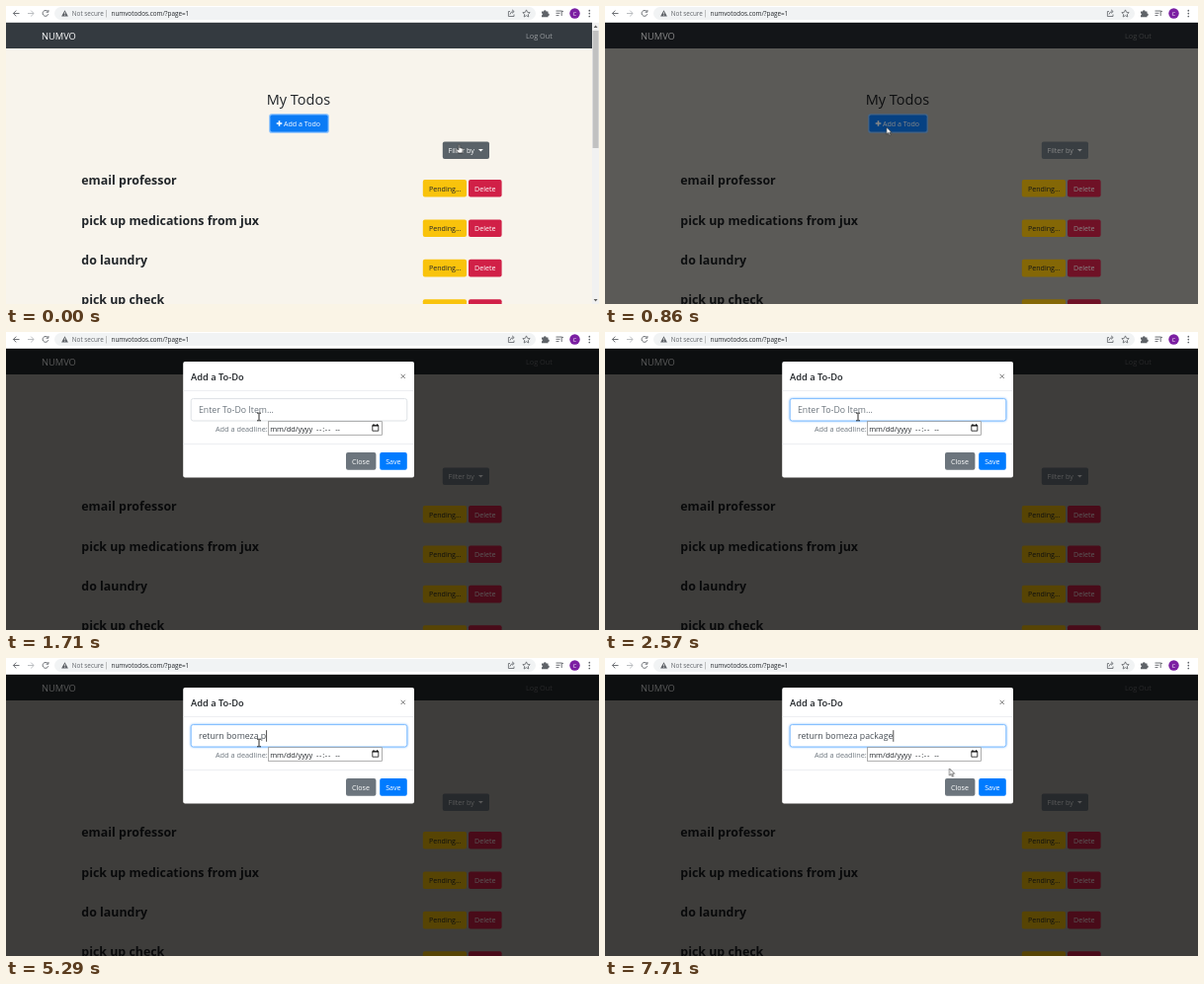
An HTML page for the animation above (8 s loop, 600 px wide and 302 px high).

```html
<!DOCTYPE html>
<html lang="en">
<head>
<meta charset="utf-8">
<title>My Todos</title>
<style>
html, body { margin: 0; width: 100%; height: 100%; overflow: hidden; background: #f8f4ec; }
svg { display: block; width: 100vw; height: 100vh; font-family: "Open Sans", "Noto Sans", sans-serif; }
text { white-space: pre; fill: #212529; }
.ui { font-size: 7.1px; }
.url { font-size: 6.35px; }
.todo { font-size: 12.4px; font-weight: 700; }
.light { fill: #fff; }
.grey { fill: #6c757d; }
.icon { fill: none; stroke: #5f6368; stroke-width: .9; }

/* One loop is 56 ticks of 1/7 s; a tick is 1.7857% */
.anim { animation: 8s step-end -10ms infinite; }
#dim { animation-name: dim; }
#lit { animation-name: lit; }
#bar { animation-name: bar; }
#filter { animation-name: hover; }
#modal { animation-name: drop; }
#field { animation-name: focus; }
#pointer { animation-name: move; }
#hand { animation-name: hand; }
#arrow { animation-name: arrow; }
#beam { animation-name: beam; }

@keyframes dim {
  0% { opacity: 0; }
  10.714% { opacity: .63; }
  12.5%, 100% { opacity: .75; }
}
@keyframes lit {
  0% { filter: brightness(1); }
  10.714% { filter: brightness(.53); }
  12.5%, 100% { filter: brightness(.35); }
}
@keyframes bar {
  0% { opacity: 1; }
  10.714%, 100% { opacity: 0; }
}
@keyframes hover {
  0% { fill: #5a6268; }
  1.786%, 100% { fill: #6c757d; }
}
@keyframes drop {
  0% { opacity: 0; transform: translateY(-9px); }
  12.5% { opacity: .89; transform: translateY(-9px); }
  14.286%, 100% { opacity: 1; transform: none; }
}
@keyframes focus {
  0% { stroke: #dde1e5; filter: none; }
  26.786%, 100% { stroke: #80bdff; filter: drop-shadow(0 0 1.2px #80bdff); }
}
@keyframes move {
  0% { transform: translate(458.5px, 140px); }
  1.786% { transform: translate(458.5px, 140px); animation-timing-function: steps(4, start); }
  8.929% { transform: translate(284.8px, 122.8px); }
  16.071% { transform: translate(284.8px, 122.8px); animation-timing-function: steps(4, start); }
  23.214% { transform: translate(256px, 86px); }
  89.286% { transform: translate(256px, 86px); animation-timing-function: steps(5, start); }
  98.214%, 100% { transform: translate(348.5px, 112px); }
}
@keyframes hand {
  0% { opacity: 1; }
  1.786% { opacity: 0; }
  7.143% { opacity: 1; }
  10.714%, 100% { opacity: 0; }
}
@keyframes arrow {
  0% { opacity: 0; }
  1.786% { opacity: 1; }
  7.143% { opacity: 0; }
  10.714% { opacity: 1; }
  21.429% { opacity: 0; }
  89.286%, 100% { opacity: 1; }
}
@keyframes beam {
  0% { opacity: 0; }
  21.429% { opacity: 1; }
  89.286%, 100% { opacity: 0; }
}
</style>
</head>
<body>
<svg viewBox="0 0 600 302" preserveAspectRatio="none">
  <defs>
    <g id="actions">
      <rect x="421.8" y="176" width="44.2" height="17.6" rx="2" fill="#f9c30c"/>
      <text class="ui" x="428" y="187.6">Pending...</text>
      <rect x="468" y="176" width="33.6" height="17.6" rx="2" fill="#d12047"/>
      <text class="ui light" x="474" y="187.6">Delete</text>
    </g>
  </defs>

  <!-- page -->
  <rect width="600" height="302" fill="#f8f4ec"/>
  <rect y="16" width="600" height="27" fill="#343a40"/>
  <text x="526" y="33.4" font-size="7.3" style="fill:#9a9da0">Log Out</text>
  <text x="263.7" y="99.5" font-size="14.5" font-weight="500">My Todos</text>
  <g class="todo">
    <text x="76.3" y="181.3">email professor</text>
    <text x="76.3" y="221.6">pick up medications from jux</text>
    <text x="76.3" y="262">do laundry</text>
    <text x="76.3" y="302.3">pick up check</text>
  </g>
  <rect id="dim" class="anim" y="16" width="600" height="286"/>

  <g id="lit" class="anim">
    <text class="light" x="36" y="33.7" font-size="9.3">NUMVO</text>
    <rect x="266.2" y="109.2" width="60.6" height="19.6" rx="2.6" fill="#80bdff"/>
    <rect x="267.4" y="110.4" width="58.2" height="17.2" rx="1.8" fill="#0b7bf5"/>
    <path d="M273.7 119h5.6M276.5 116.2v5.6" stroke="#fff" stroke-width="1.6"/>
    <text class="ui light" x="281" y="121.6">Add a Todo</text>
    <rect id="filter" class="anim" x="441.8" y="137.5" width="47.2" height="17.6" rx="2"/>
    <text class="ui light" x="447.6" y="149">Filter by</text>
    <path d="M478 145h4.8l-2.4 2.5z" fill="#fff"/>
    <use href="#actions"/>
    <use href="#actions" y="40.4"/>
    <use href="#actions" y="80.8"/>
    <use href="#actions" y="121.2"/>
  </g>

  <g id="bar" class="anim">
    <rect x="593" y="16" width="7" height="286" fill="#f1f1f1"/>
    <rect x="593.6" y="25" width="6" height="119" fill="#c1c1c1"/>
    <path d="M594.6 22h4l-2-2.6zM594.6 297h4l-2 2.6z" fill="#606060"/>
  </g>

  <!-- browser bar -->
  <rect width="600" height="16.8" fill="#fff"/>
  <rect x="49" y="1" width="487" height="13" rx="6.5" fill="#f1f3f4"/>
  <g class="icon">
    <path d="M13.5 7.5h-6M10.3 4.6L7.4 7.5l2.9 2.9"/>
    <path d="M22 7.5h6M25.2 4.6l2.9 2.9l-2.9 2.9" stroke="#b4b7ba"/>
    <path d="M42.3 5.6a2.9 2.9 0 1 0 .5 2.6M42.9 4v2.2h-2.3"/>
    <path d="M101.5 4v7.5" stroke="#aaa" stroke-width=".7"/>
    <path d="M510 5.5h-1.6v5h5.6v-2M510 8.6q.4-3 3.4-3M512 3.8l2.2 1.8l-2.2 1.8" stroke-width=".8"/>
    <path d="M526.5 3.9l1.1 2.4l2.6.3l-1.9 1.8l.5 2.6l-2.3-1.3l-2.3 1.3l.5-2.6l-1.9-1.8l2.6-.3z" stroke-width=".8"/>
    <path d="M556.5 5h6M556.5 7.3h4M556.5 9.6h3M562.2 10V5.4h1.8"/>
  </g>
  <g fill="#5f6368">
    <path d="M59.5 4.2l3.4 6.2h-6.8z"/>
    <path d="M542 5.5h2a1.3 1.3 0 0 1 2.6 0h1.9v2a1.3 1.3 0 0 1 0 2.6v1.2h-6.5v-1.8a1.2 1.2 0 0 0 0-2.3z"/>
    <circle cx="590.3" cy="4.7" r=".85"/>
    <circle cx="590.3" cy="7.6" r=".85"/>
    <circle cx="590.3" cy="10.5" r=".85"/>
  </g>
  <path d="M59.5 6.3v2M59.5 8.8v.8" stroke="#fff" stroke-width=".7"/>
  <text class="url" x="66.8" y="10" style="fill:#5f6368">Not secure</text>
  <text class="url" x="106.5" y="10">numvotodos.com/?page=1</text>
  <circle cx="575.5" cy="7.5" r="5.2" fill="#7b1fa2"/>
  <text class="light" x="575.5" y="9.8" font-size="6" text-anchor="middle">C</text>

  <!-- dialog -->
  <g id="modal" class="anim">
    <rect x="179.2" y="30" width="233.8" height="117.6" rx="2" fill="#fff"/>
    <path d="M179.5 59.5h233.2M179.5 113.5h233.2" stroke="#e6e9ec" stroke-width=".7"/>
    <text x="187" y="48.6" font-size="9.3" font-weight="600">Add a To-Do</text>
    <path d="M399.6 42.8l4.2 4.2M403.8 42.8l-4.2 4.2" stroke="#777" stroke-width="1"/>
    <rect id="field" class="anim" x="187.2" y="67.6" width="218.6" height="22.4" rx="2.2" fill="#fff"/>
    <text id="entry" x="195" y="82.4" font-size="8.75"></text>
    <path id="caret" d="M.4 73.2v11.6" stroke="#222" stroke-width=".8"/>
    <text class="grey" x="212" y="100.7" font-size="7.3">Add a deadline:</text>
    <rect x="265.5" y="90.7" width="115" height="13.6" fill="#fff" stroke="#8a8a8a" stroke-width=".7"/>
    <g font-size="7.4">
      <text x="267.2" y="100.6">mm/dd/yyyy</text>
      <text x="314" y="100.6" letter-spacing=".7">--:--</text>
      <text x="333.2" y="100.6">--</text>
    </g>
    <path d="M370.8 94.6h6v5.6h-6z" fill="none" stroke="#111" stroke-width=".8"/>
    <path d="M370.6 95h6.4M372 93.2v1.4M375.6 93.2v1.4" stroke="#111" stroke-width="1.2"/>
    <rect x="344" y="122" width="30.4" height="17.8" rx="2" fill="#6c757d"/>
    <text class="ui light" x="350" y="133.8">Close</text>
    <rect x="378.2" y="122" width="27.6" height="17.8" rx="2" fill="#007bff"/>
    <text class="ui light" x="384.2" y="133.8">Save</text>
  </g>

  <g id="pointer" class="anim">
    <path id="hand" class="anim" d="M-.7 .6q.7-1.1 1.4 0v3l2.6.7q.8.3.6 1.4l-.6 3.3h-4.3l-2.4-3.4q.2-1 1.2-.5l1.5 1z" fill="#fff" stroke="#111" stroke-width=".6"/>
    <path id="arrow" class="anim" d="M0 0v7.2l1.7-1.6l1.2 2.7l1.2-.5l-1.2-2.6h2.3z" fill="#fff" stroke="#222" stroke-width=".6"/>
    <path id="beam" class="anim" d="M-2-3.8h1.4l.6.5l.6-.5h1.4M-2 3.8h1.4l.6-.5l.6.5h1.4M0-3.3v6.6" fill="none" stroke="#111" stroke-width=".9"/>
  </g>
</svg>
<script>
const phrase = "return bomeza package";
// tick at which each letter is typed
const keys = [20, 21, 22, 23, 24, 25, 26, 27, 28, 29, 31, 32, 34, 35, 37, 38, 39, 40, 41, 42, 43];
const entry = document.getElementById("entry");
const caret = document.getElementById("caret");

function draw(now) {
  const tick = Math.floor((now + 10) % 8000 * 7 / 1000);
  const count = keys.filter(k => k <= tick).length;
  const typed = phrase.slice(0, count);
  const label = typed || "Enter To-Do Item...";
  if (entry.textContent !== label) entry.textContent = label;
  entry.style.fill = typed ? "#495057" : "#6c757d";
  const width = typed ? entry.getComputedTextLength() : 0;
  caret.setAttribute("transform", `translate(${195 + width} 0)`);
  const blink = (tick >= 18 && tick < 20) || (tick >= 47 && tick < 50);
  caret.style.opacity = tick < 15 || blink ? 0 : 1;
  requestAnimationFrame(draw);
}
requestAnimationFrame(draw);
</script>
</body>
</html>
```
